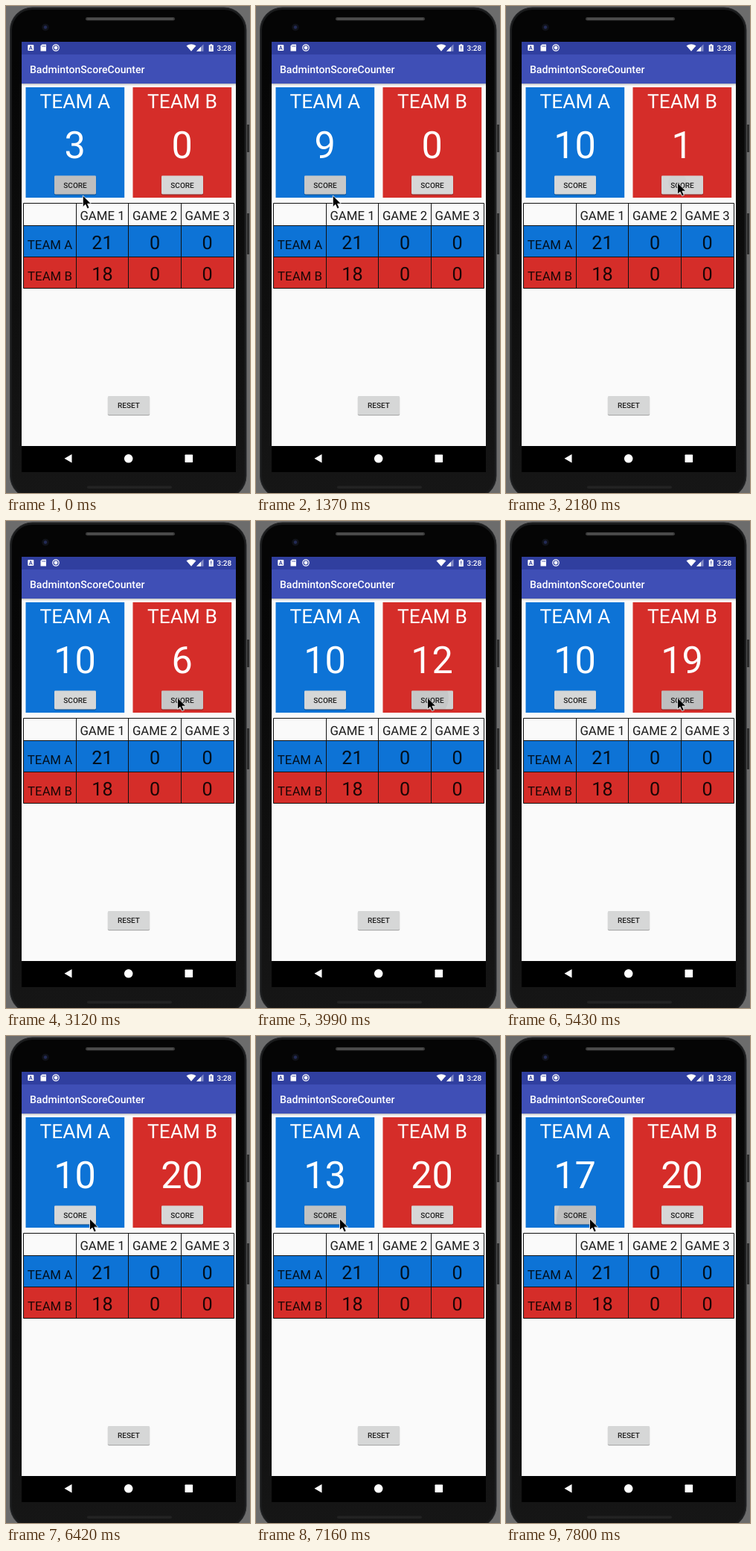
These frames come from a looping animation (328x653 px, 8 s). An HTML page:

```html
<!DOCTYPE html>
<html lang="en">
<head>
<meta charset="utf-8">
<title>Score counter</title>
<style>
html, body { margin: 0; width: 100%; height: 100%; overflow: hidden; background: #6c6c6c; }
svg { display: block; width: 328px; height: 653px; }
text { font-family: Roboto, "Noto Sans", sans-serif; text-rendering: geometricPrecision; }
.mid { text-anchor: middle; }
.med { font-weight: 500; }
.team { font-size: 26.4px; fill: #fff; }
.score { font-size: 50.4px; fill: #fff; }
.label { font-size: 10px; fill: #202020; }
.head { font-size: 16.8px; fill: #1c1c1c; }
.num { font-size: 25.2px; fill: #000; fill-opacity: .87; }
.row { font-size: 16.8px; fill: #000; fill-opacity: .87; }
</style>
</head>
<body>
<svg viewBox="0 0 328 653">
  <defs>
    <linearGradient id="shade" x2="0" y2="1">
      <stop stop-color="#000" stop-opacity=".24"/>
      <stop offset="1" stop-color="#000" stop-opacity="0"/>
    </linearGradient>
    <linearGradient id="glass" x2="0" y2="1">
      <stop offset=".1" stop-color="#050505"/>
      <stop offset="1" stop-color="#161616"/>
    </linearGradient>
    <clipPath id="clipA"><rect x="65" y="227.5" width="56" height="25" rx="1.4"/></clipPath>
    <clipPath id="clipB"><rect x="209" y="227.5" width="56" height="25" rx="1.4"/></clipPath>
  </defs>

  <!-- phone -->
  <rect width="328" height="653" fill="#6c6c6c"/>
  <path d="M325.5 159V196M325.5 278V333" stroke="#2c2c2c" stroke-width="3"/>
  <rect x="5.5" y="2" width="317.5" height="658" rx="30" fill="#1a1b1c" stroke="#2b2c2e"/>
  <rect x="8" y="5" width="312.5" height="652" rx="27" fill="url(#glass)"/>
  <rect x="107" y="15" width="120" height="4.6" rx="2.3" fill="#3a3a3a"/>
  <rect x="109" y="16.4" width="116" height="1.8" rx=".9" fill="#555"/>
  <circle cx="53" cy="28.5" r="4.8" fill="#101219"/>
  <circle cx="53" cy="28.5" r="2.2" fill="#232b55"/>
  <rect x="109" y="643.5" width="114" height="3.6" rx="1.8" fill="#232323"/>

  <!-- screen -->
  <rect x="21" y="48" width="288" height="577" fill="#000"/>
  <rect x="21" y="104" width="288" height="486" fill="#fafafa"/>
  <rect x="21" y="48" width="288" height="17" fill="#303f9f"/>
  <rect x="21" y="65" width="288" height="39" fill="#3f4fb6"/>
  <rect x="21" y="104" width="288" height="3" fill="url(#shade)"/>
  <text class="med" x="32" y="89.5" font-size="14.05" fill="#fff">BadmintonScoreCounter</text>

  <!-- status icons -->
  <g fill="#fff">
    <rect x="29.3" y="52" width="8" height="8" rx="1"/>
    <path d="M48.5 51.5H54V60.5H46.5V53.5Z"/>
    <circle cx="67" cy="56" r="4.2" fill="none" stroke="#fff" stroke-width="1.2"/>
    <circle cx="67" cy="56" r="2.4"/>
    <path d="M242.5 53.2Q249 49.2 255.5 53.2L249 60.7Z"/>
    <path d="M256 60.7L265.5 51.2V60.7Z" fill-opacity=".4"/>
    <path d="M256 60.7L262 54.7V60.7Z"/>
    <path d="M274.5 51.2H277V52.2H278.8V61H272.7V52.2H274.5Z"/>
    <text class="med" x="283.5" y="59.7" font-size="10">3:28</text>
  </g>
  <path d="M31.2 58.8L33.25 53.4L35.3 58.8M32 57.2H34.5" fill="none" stroke="#303f9f"/>
  <path d="M275.7 53.4V57.4M275.7 58.4V59.6" stroke="#303f9f" stroke-width="1.1"/>
  <path d="M49 53V55M50.8 53V55M52.4 53V55" stroke="#303f9f" stroke-width=".7"/>

  <!-- navigation -->
  <g fill="#fff">
    <path d="M78.5 606.8L88.5 601.1V612.5Z"/>
    <circle cx="164.7" cy="606.8" r="5.8"/>
    <rect x="240.5" y="601.5" width="10.6" height="10.6" rx=".8"/>
  </g>

  <g id="ui"></g>
  <path id="cursor" d="M0 0V15.4L3.5 12.2L6 17.8L8.7 16.6L6.3 11.2H11.2Z"
    fill="#000" stroke="#fff" stroke-width=".8" stroke-linejoin="round"/>
</svg>
<script>
const LOOP = 8000;
const BLUE = "#0d73d6", RED = "#d52d29";
const ui = document.getElementById("ui");
const cursor = document.getElementById("cursor");

const text = (cls, x, y, s, id = "") =>
  `<text class="mid ${cls}" x="${x}" y="${y}"${id && ` id="${id}"`}>${s}</text>`;
const box = (x, y, w, h, fill, extra = "") =>
  `<rect x="${x}" y="${y}" width="${w}" height="${h}" fill="${fill}" ${extra}/>`;

function button(cx, y, label, key) {
  const x = cx - 28, round = 'rx="1.4"';
  const ripple = key ? `<g id="press${key}" clip-path="url(#clip${key})">
    ${box(x, y, 56, 25, "#000", 'fill-opacity=".05"')}
    <circle id="wave${key}" fill="#000" fill-opacity=".065"/></g>` : "";
  return box(x - .4, y + .6, 56.8, 26, "#000", 'rx="2" fill-opacity=".13"') +
    box(x, y + .5, 56, 25.4, "#000", 'rx="1.6" fill-opacity=".22"') +
    box(x, y, 56, 25, "#d6d7d7", round) + ripple +
    text("label med", cx, y + 16.3, label);
}

function panel(key, x, fill) {
  const cx = x + 66.4;
  return box(x, 109, 132.7, 148, fill) +
    text("team", cx, 137, "TEAM " + key) +
    text("score", cx - .3, 204, "0", "score" + key) +
    button(cx + .1, 227.5, "SCORE", key);
}

function table() {
  const cols = [129.5, 200, 270.7];
  let s = box(23.5, 294.5, 283, 42, BLUE) + box(23.5, 336.5, 283, 42, RED);
  s += '<path d="M23.5 264.5H306.5V378.5H23.5ZM23.5 294.5H306.5M23.5 336.5H306.5' +
    'M94.5 264V378M164.5 264V378M235.5 264V378" fill="none" stroke="#111"/>';
  cols.forEach((x, i) => {
    s += text("head", x, 287, "GAME " + (i + 1));
    s += text("num", x, 325.6, i ? 0 : 21) + text("num", x, 367.6, i ? 0 : 18);
  });
  return s + text("row", 59, 325.6, "TEAM A") + text("row", 59, 367.6, "TEAM B");
}

ui.innerHTML = panel("A", 26.5, BLUE) + panel("B", 170.5, RED) + table() +
  button(165, 523, "RESET");

const run = (start, step, n) => Array.from({ length: n }, (_, i) => start + i * step);
const taps = {
  A: [...run(400, 165, 7), ...run(6710, 165, 7)],
  B: [...run(2180, 160, 18), 5320, 5490]
};
const first = { A: 3, B: 0 };

const clamp = v => Math.max(0, Math.min(1, v));
const ease = v => v * v * (3 - 2 * v);
const part = (t, a, b) => ease(clamp((t - a) / (b - a)));

// Quadratic path between two points, bent by a control point
function bend(p, c, q, k) {
  return [0, 1].map(i => (1 - k) ** 2 * p[i] + 2 * k * (1 - k) * c[i] + k * k * q[i]);
}

function pointer(t) {
  const left = [103.3, 254], right = [230.6, 237], back = [112.5, 245];
  return t < 4000
    ? bend(left, [165, 249], right, part(t, 1520, 1940))
    : bend(right, [165, 266], back, part(t, 5860, 6420));
}

function drawTeam(key, t, at) {
  const done = taps[key].filter(c => c <= t);
  const age = done.length ? t - done[done.length - 1] : 1e4;
  const held = key === "A" && t < 400;
  const again = done.length > 1 && done[done.length - 1] - done[done.length - 2] < 300;
  const rise = held ? 1 : Math.max(again ? .6 : .3, clamp(age / 80));
  const fade = held ? 1 : 1 - clamp((age - 110) / 90);
  document.getElementById("score" + key).textContent = first[key] + done.length;
  document.getElementById("press" + key).setAttribute("opacity", rise * fade);
  const wave = document.getElementById("wave" + key);
  wave.setAttribute("cx", at[0]);
  wave.setAttribute("cy", Math.min(at[1], 250));
  wave.setAttribute("r", held ? 80 : 12 + 45 * clamp(age / 140));
}

function draw(t) {
  const at = pointer(t);
  drawTeam("A", t, at);
  drawTeam("B", t, at);
  cursor.setAttribute("transform", `translate(${at[0]} ${at[1]})`);
}

const begin = performance.now();
function frame() {
  draw((performance.now() - begin) % LOOP);
  requestAnimationFrame(frame);
}
frame();
</script>
</body>
</html>
```
